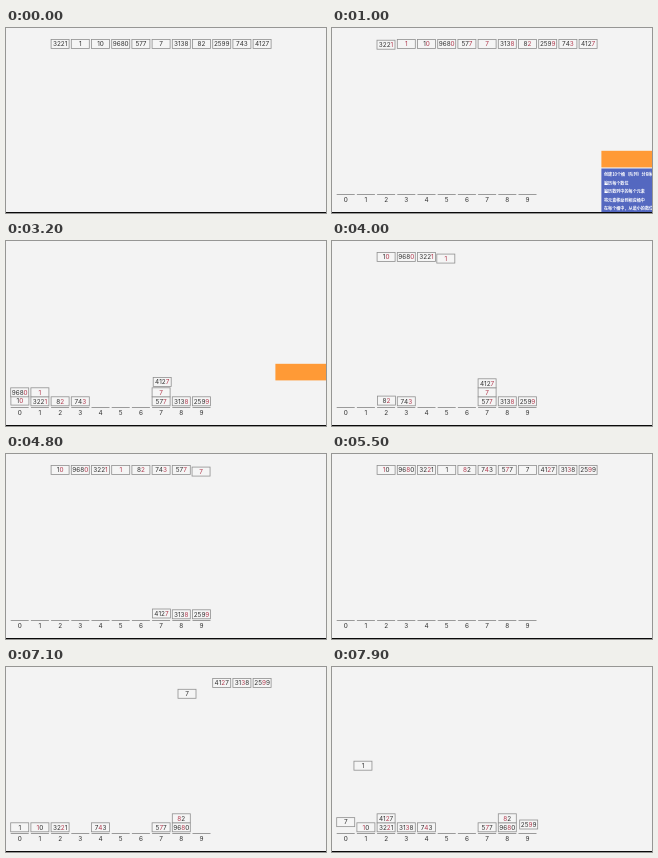
An HTML page with a canvas for the animation above (8 s loop, 320x185 px).

```html
<!DOCTYPE html>
<html lang="zh">
<head>
<meta charset="utf-8">
<title>Radix sort</title>
<style>
  html, body { margin: 0; width: 100%; height: 100%; overflow: hidden; background: #f3f3f3; }
  canvas { display: block; width: 320px; height: 185px; }
</style>
</head>
<body>
<canvas id="stage"></canvas>
<script>
const W = 320, H = 185, LOOP = 8000, STEP = 100;
const BG = '#f3f3f3', INK = '#333', RED = '#b23c50', EDGE = '#909090';
const DIGITS = 'Inter, "Liberation Sans", sans-serif';
const CJK = '"Noto Sans CJK SC", "Noto Sans CJK", sans-serif';
const MOVE = 225;
const values = [3221, 1, 10, 9680, 577, 7, 3138, 82, 2599, 743, 4127];
const notes = [
  '创建10个桶（队列）分别标记',
  '遍历每个数位',
  '遍历数列中的每个元素',
  '将元素移动到相应桶中',
  '在每个桶中，从最小的数位'
];

const canvas = document.getElementById('stage');
const ctx = canvas.getContext('2d');
const dpr = window.devicePixelRatio || 1;
canvas.width = W * dpr;
canvas.height = H * dpr;

const column = c => 13.7 + 20.2 * c;
const rowSlot = i => ({ x: column(i + 2), y: 16 });
const bucketSlot = (b, level) => ({ x: column(b), y: 160.3 - 9 * level });
const clamp = v => Math.min(1, Math.max(0, v));
const ramp = (t, start, length) => clamp((t - start) / length);
const ease = p => (1 - Math.cos(Math.PI * p)) / 2;

const items = values.map((value, i) => {
  const home = rowSlot(i);
  return { text: String(value), value, home, last: home, moves: [] };
});

function send(item, start, to) {
  item.moves.push({ start, dx: to.x - item.last.x, dy: to.y - item.last.y });
  item.last = to;
}

function distribute(list, place, start, gap) {
  const buckets = Array.from({ length: 10 }, () => []);
  list.forEach((item, i) => {
    const b = Math.floor(item.value / place) % 10;
    send(item, start + i * gap, bucketSlot(b, buckets[b].length));
    buckets[b].push(item);
  });
  return buckets;
}

// Each departure lets the rest of its bucket sink one level.
function collect(buckets, start, gap) {
  const list = [];
  buckets.forEach((queue, b) => {
    while (queue.length) {
      const item = queue.shift();
      const at = start + list.length * gap;
      send(item, at, rowSlot(list.length));
      queue.forEach((rest, level) => send(rest, at, bucketSlot(b, level)));
      list.push(item);
    }
  });
  return list;
}

const byOnes = collect(distribute(items, 1, 990, 200), 3190, 200);
collect(distribute(byOnes, 10, 5575, 212), 7798, 200);

function pose(item, t) {
  let { x, y } = item.home, started = -1;
  for (const m of item.moves) {
    if (t < m.start) break;
    const p = ease(ramp(t, m.start, MOVE));
    x += m.dx * p;
    y += m.dy * p;
    started = m.start;
  }
  return { x, y, started };
}

function setFont(size, family, weight = '') {
  ctx.font = `${weight} ${size}px ${family}`;
}

function drawDigits(text, x, y, ones, tens) {
  setFont(6.4, DIGITS);
  ctx.textAlign = 'left';
  const digits = [...text];
  const widths = digits.map(d => ctx.measureText(d).width);
  let left = x - widths.reduce((sum, w) => sum + w, 0) / 2;
  digits.forEach((digit, i) => {
    const place = digits.length - 1 - i;
    const red = place === 0 ? ones : place === 1 ? tens : 0;
    ctx.fillStyle = red > 0.5 ? RED : INK;
    ctx.fillText(digit, left, y);
    left += widths[i];
  });
}

function drawItem(item, at, ones, tens) {
  ctx.fillStyle = '#f5f5f5';
  ctx.fillRect(at.x - 9, at.y - 4.5, 18, 9);
  ctx.strokeStyle = EDGE;
  ctx.lineWidth = 0.8;
  ctx.strokeRect(at.x - 9, at.y - 4.5, 18, 9);
  drawDigits(item.text, at.x, at.y + 2.3, ones, tens);
}

function drawBuckets(alpha) {
  ctx.globalAlpha = alpha;
  for (let b = 0; b < 10; b++) {
    const x = column(b);
    ctx.fillStyle = EDGE;
    ctx.fillRect(x - 9, 166, 18, 0.9);
    drawDigits(String(b), x, 173.8, 0, 0);
  }
  ctx.globalAlpha = 1;
}

function drawPanel(t) {
  const shown = ramp(t, 600, 300);
  ctx.globalAlpha = shown * (1 - ramp(t, 3300, 300));
  ctx.fillStyle = '#ff9a36';
  ctx.fillRect(269.4, 122.8, 50.6, 16.6);

  ctx.globalAlpha = shown * (1 - ramp(t, 2800, 300));
  ctx.fillStyle = '#5468c0';
  ctx.fillRect(269.4, 140.5, 50.6, 45);
  ctx.fillStyle = '#fff';
  ctx.textAlign = 'left';
  setFont(4.1, CJK, 'bold');
  notes.forEach((line, i) => ctx.fillText(line, 272, 148 + 8.6 * i));
  ctx.globalAlpha = 1;
}

function draw(t) {
  ctx.setTransform(dpr, 0, 0, dpr, 0, 0);
  ctx.fillStyle = BG;
  ctx.fillRect(0, 0, W, H);

  drawBuckets(ramp(t, 450, 300));
  drawPanel(t);

  const tens = ramp(t, 5430, 130);
  const ones = ramp(t, 0, 200) * (1 - tens);
  items
    .map(item => ({ item, at: pose(item, t) }))
    .sort((a, b) => a.at.started - b.at.started)
    .forEach(({ item, at }) => drawItem(item, at, ones, tens));

  ctx.fillStyle = '#0a0a0a';
  ctx.fillRect(0, 184, W, 1);
}

const begin = performance.now();
function tick() {
  const t = (performance.now() - begin + 10) % LOOP;
  draw(Math.floor(t / STEP) * STEP);
  requestAnimationFrame(tick);
}
tick();
</script>
</body>
</html>
```
